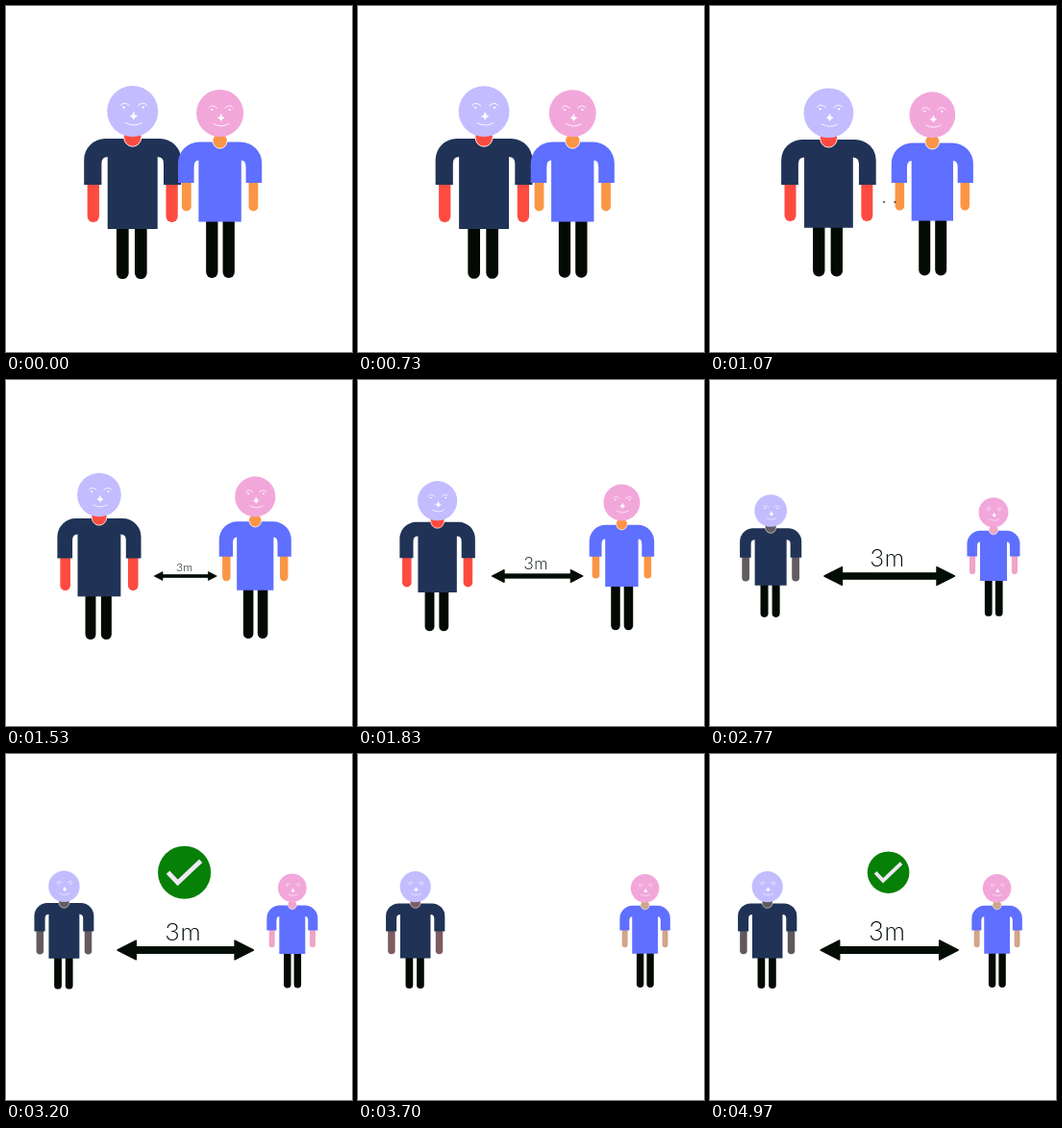
These frames come from a looping animation (360 by 360 pixels, 5 s). An HTML page:

```html
<!DOCTYPE html>
<html lang="en">
<head>
<meta charset="utf-8">
<title>Keep your distance</title>
<style>
  html, body { margin: 0; width: 100%; height: 100%; overflow: hidden; background: #fff; }
  svg { display: block; width: 100vw; height: 100vh; }
  .face { fill: none; stroke: #fff; stroke-width: 0.9; stroke-linecap: round; }
  .limb { stroke-linecap: round; }
  .leg { stroke: #020a03; }
  .ink { fill: #030d06; stroke: #030d06; stroke-width: 1.5; stroke-linejoin: round; }
  text { font: 300 26.5px Lato, "Open Sans", sans-serif; letter-spacing: 0.8px; fill: #030d06; text-anchor: middle; }
</style>
</head>
<body>
<svg viewBox="0 0 360 360">
  <g id="left"></g>
  <g id="right"></g>
  <g id="arrow">
    <path class="ink" d="M-71.5 0L-52-10V10ZM71.5 0L52-10V10Z"/>
    <g id="shaft">
      <rect x="-54" y="-4" width="108" height="8" fill="#030d06"/>
      <text x="-2.2" y="-10.3">3m</text>
    </g>
  </g>
  <g id="check">
    <circle r="21.8" fill="#068006"/>
    <path d="M-13.5 0L-5.5 8.5L13.5-9.5" fill="none" stroke="#efe8f4" stroke-width="3.8"/>
  </g>
</svg>
<script>
const LOOP = 5000, MOVE_START = 570, MOVE_TIME = 3040, ARROW_LAG = 32;
const $ = id => document.getElementById(id);

// Sizes are measured from the centre line and the top of the head.
const people = [
  { el: $('left'), head: '#c3bcff', shirt: '#203356',
    r: 26.5, top: 55, hem: 149, sleeve: 103, hand: 142, foot: 201,
    torso: 26, outer: 50.5, cuff: 18.2, arm: 12.3, leg: 9.5, legX: -0.9, legW: 12.7, neck: 9,
    x: [131.7, 59.7], y: [83, 122], scale: [1, 0.607],
    skin: [[0, '#fe4b40'], [2170, '#ee5560'], [2500, '#625c60'], [3230, '#7c5b61'], [4300, '#5f585d']] },
  { el: $('right'), head: '#f2a7db', shirt: '#5f6fff',
    r: 24.5, top: 54.5, hem: 137.5, sleeve: 97, hand: 126.5, foot: 196,
    torso: 22.2, outer: 43.6, cuff: 16.6, arm: 9.8, leg: 8.7, legX: 0.4, legW: 12.3, neck: 7.5,
    x: [222.6, 298.6], y: [87, 125], scale: [1, 0.602],
    skin: [[0, '#fa9646'], [2170, '#f4704f'], [2500, '#f0a5c6'], [3230, '#d1a588']] }
];

const checkScale = [[3080, 0], [3200, 1.26], [3350, 1.9], [3600, 0], [3800, 0], [3970, 1.9], [4240, 1]];

const limb = (x, y1, y2, w, cls) =>
  `<path class="limb ${cls}" d="M${x} ${y1}V${y2 - w / 2}" stroke-width="${w}"/>`;

function shirtPath(p) {
  const R = 22, { outer: o, top: t, sleeve: e, torso: b, hem: h } = p;
  const i = o - p.cuff, gap = t + 19;
  return `M${-o} ${e}V${t + R}A${R} ${R} 0 0 1 ${R - o} ${t}H${o - R}A${R} ${R} 0 0 1 ${o} ${t + R}` +
    `V${e}H${i}V${gap + 7}Q${i} ${gap} ${b} ${gap}V${h}H${-b}V${gap}Q${-i} ${gap} ${-i} ${gap + 7}V${e}Z`;
}

function build(p) {
  const armX = p.outer - p.cuff / 2 - 0.5, k = p.r / 26.5, neckY = p.top - 0.8;
  p.el.innerHTML =
    limb(p.legX - p.leg, p.hem - 8, p.foot, p.legW, 'leg') +
    limb(p.legX + p.leg, p.hem - 8, p.foot, p.legW, 'leg') +
    `<g class="skin">${limb(-armX, p.sleeve - 9, p.hand, p.arm, '')}${limb(armX, p.sleeve - 9, p.hand, p.arm, '')}</g>` +
    `<path d="${shirtPath(p)}" fill="${p.shirt}"/>` +
    `<circle class="skin" cy="${neckY}" r="${p.neck}"/>` +
    `<path class="face" d="M${-p.neck} ${neckY}A${p.neck} ${p.neck} 0 0 0 ${p.neck} ${neckY}"/>` +
    `<circle cy="${p.r}" r="${p.r}" fill="${p.head}"/>` +
    `<g class="face" transform="translate(0.7 ${p.r}) scale(${k})">
      <path d="M-13-6Q-10-11-4-6M5-6Q11-11 14-6"/>
      <path d="M-8 12Q1 17 9 12"/>
      <path d="M-10-4h.6M10-4h.6" stroke-width="2"/>
      <path d="M.5 1.5Q1 5 4 5.2Q1 5.6 .5 8.5Q0 5.6-3 5.2Q0 5 .5 1.5Z" fill="#fff"/>
    </g>`;
  p.skinEls = [...p.el.querySelectorAll('.skin')];
}

const mix = ([a, b], k) => a + (b - a) * k;

// cubic-bezier(.345, 0, .184, 1)
function ease(x) {
  if (x <= 0) return 0;
  if (x >= 1) return 1;
  let lo = 0, hi = 1, s;
  for (let n = 0; n < 24; n++) {
    s = (lo + hi) / 2;
    const u = 1 - s;
    if (3 * u * u * s * 0.345 + 3 * u * s * s * 0.184 + s * s * s < x) lo = s; else hi = s;
  }
  return s * s * (3 - 2 * s);
}

function track(steps, t) {
  if (t <= steps[0][0]) return steps[0][1];
  for (let i = 1; i < steps.length; i++) {
    const [t0, v0] = steps[i - 1], [t1, v1] = steps[i];
    if (t < t1) return mix([v0, v1], (t - t0) / (t1 - t0));
  }
  return steps[steps.length - 1][1];
}

const place = (el, x, y, s) => el.setAttribute('transform', `translate(${x} ${y}) scale(${s})`);
const show = (el, on) => { el.style.display = on ? '' : 'none'; };

function draw(t) {
  const p = ease((t - MOVE_START) / MOVE_TIME);
  const q = p * (0.47 + 0.53 * p); // shrinking trails the sideways move
  for (const who of people) {
    place(who.el, mix(who.x, p), mix(who.y, q), mix(who.scale, q));
    const color = who.skin.filter(s => s[0] <= t).pop()[1];
    for (const el of who.skinEls) {
      el.style[el.tagName === 'g' ? 'stroke' : 'fill'] = color;
    }
  }

  const a = ease((t - MOVE_START - ARROW_LAG) / MOVE_TIME);
  place($('arrow'), 186.7, 204, a);
  show($('arrow'), a > 0 && (t < 3600 || t >= 3800));
  show($('shaft'), a > 0.11);

  const c = track(checkScale, t);
  place($('check'), 185.6, 123.2, c);
  show($('check'), c > 0);
}

people.forEach(build);
const start = performance.now();
function tick() {
  draw((performance.now() - start) % LOOP);
  requestAnimationFrame(tick);
}
tick();
</script>
</body>
</html>
```
